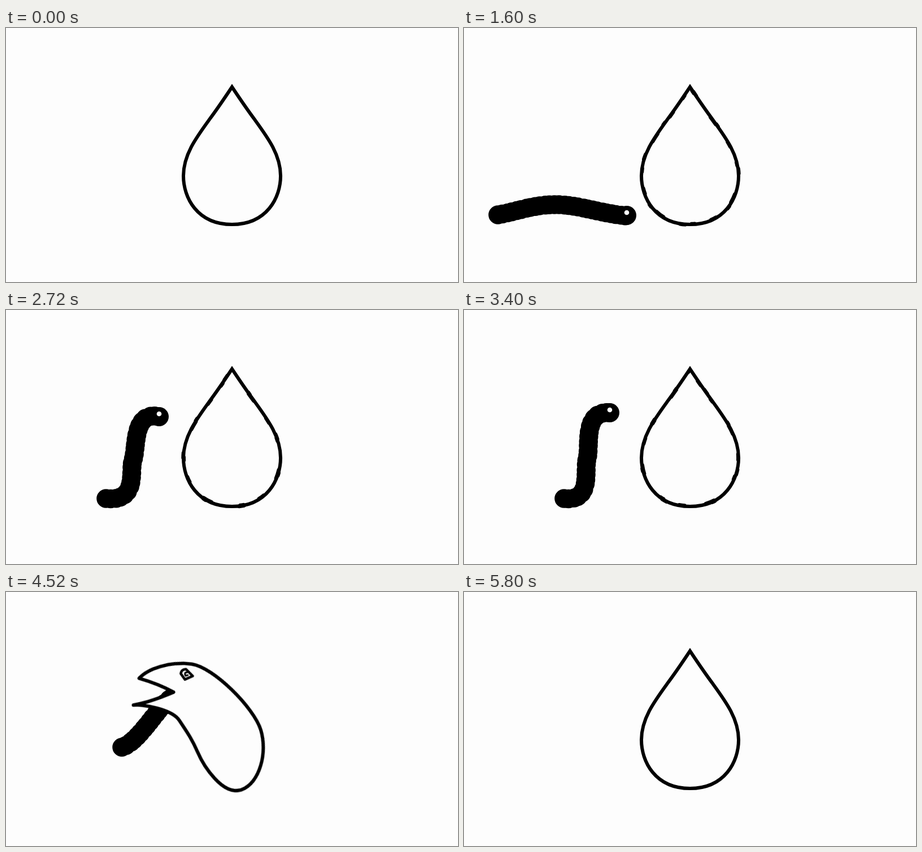
Animation of 800 by 450 pixels, one loop 5920 ms. Source, as an HTML page without scripts:

```html
<!DOCTYPE html>
<html lang="en">
<head>
<meta charset="utf-8">
<title>Worm and drop</title>
<style>
html, body { margin: 0; width: 100%; height: 100%; overflow: hidden; background: #fdfdfd; }
svg { display: block; width: 800px; height: 450px; }
.line { fill: none; stroke: #000; stroke-width: 6; }
.round { stroke-linecap: round; stroke-linejoin: round; }

/* everything moves in steps of about 100 ms */
.drop, .creature, .boil, .bump, .worm, .body, .face, .beast, .skin, .teeth, .eye, .glare {
  animation: 5920ms steps(3) infinite;
}
.drop, .creature, .boil, .worm, .teeth, .eye, .glare { animation-timing-function: step-end; }
.drop { animation-name: drop; }
.creature { animation-name: creature; }
.boil { animation-name: boil; }
.bump { animation-name: bump; animation-timing-function: steps(59); stroke-dasharray: 10 38 16 52 6 30; }
.in { transform: translate(400px, 240px) scale(.988) translate(-400px, -240px); }
.out { transform: translate(400px, 240px) scale(1.008) translate(-400px, -240px); stroke-dasharray: 5 61 9 83; }
.worm { animation-name: worm; }
.body { animation-name: crawl; fill: none; stroke: #000; stroke-width: 33.5; stroke-linecap: round; stroke-dasharray: 0 8 0 10 0 7 0 9; }
.face { animation-name: face; }
.beast { animation-name: lunge; transform-origin: 425px 346px; }
.skin { animation-name: morph; fill: #fdfdfd; }
.teeth { animation-name: teeth; }
.eye { animation-name: eye; }
.glare { animation-name: glare; }

@keyframes drop {
  0%, 94.5% { opacity: 1; }
  64.1% { opacity: 0; }
}
@keyframes creature {
  0%, 94.5% { opacity: 0; }
  64.1% { opacity: 1; }
}
@keyframes boil {
  0%, 97.9% { opacity: 0; }
  3.37% { opacity: 1; }
}
@keyframes bump { to { stroke-dashoffset: 2183; } }
@keyframes worm {
  0%, 81% { opacity: 0; }
  3.37% { opacity: 1; }
}
@keyframes crawl {
  0%, 1.68% { d: path("M-240 331C-200 331 -170 331 -150 331S-90 333 -60 333"); }
  6.7% { d: path("M-130 331C-90 331 -50 318 -20 318S50 333 90 333"); }
  11.8% { d: path("M0 331C25 328 45 306 66 306S105 333 130 334"); }
  16.8% { d: path("M3 331C40 330 60 312 95 312S150 333 190 333"); }
  21.9% { d: path("M5 331C45 331 90 316 120 315S190 332 235 333"); }
  27% { d: path("M60 331C95 325 125 312 165 313S240 328 288 333"); }
  32% { d: path("M117 331C150 330 165 290 200 290S250 333 286 333"); animation-timing-function: steps(4); }
  38.8% { d: path("M165 333C190 333 195 255 222 255S255 333 285 330"); }
  43.9% { d: path("M177 334C225 340 218 285 224 262S240 225 282 225"); }
  45.6%, 52.3% { d: path("M177 334C235 340 218 285 225 265S224 178 271 189"); }
  57.4% { d: path("M177 334C228 340 212 285 218 263S210 178 258 182"); }
  62.5%, 72.6% { d: path("M177 334C235 340 218 285 225 265S224 178 271 189"); animation-timing-function: step-end; }
  74.3% { d: path("M167 312C215 325 205 285 222 260S245 194 290 190"); animation-timing-function: step-end; }
  76% { d: path("M205 275C225 270 250 235 270 210S310 175 330 170"); animation-timing-function: step-end; }
  77.7% { d: path("M270 215C285 205 295 195 310 183S340 165 360 160"); animation-timing-function: step-end; }
  79.3%, 100% { d: path("M350 142C355 142 360 143 365 145S375 149 380 150"); }
}
@keyframes face {
  0%, 1.68% { transform: translate(-60px, 333px); }
  6.7% { transform: translate(90px, 333px); }
  11.8% { transform: translate(130px, 334px); }
  16.8% { transform: translate(190px, 333px); }
  21.9% { transform: translate(235px, 333px); }
  27% { transform: translate(288px, 332px); }
  32% { transform: translate(286px, 333px); animation-timing-function: steps(4); }
  38.8% { transform: translate(285px, 330px); }
  43.9% { transform: translate(282px, 225px); }
  45.6%, 52.3% { transform: translate(271px, 189px); }
  57.4% { transform: translate(258px, 182px); }
  62.5%, 72.6% { transform: translate(271px, 189px); animation-timing-function: step-end; }
  74.3% { transform: translate(290px, 190px); animation-timing-function: step-end; }
  76% { transform: translate(330px, 170px); animation-timing-function: step-end; }
  77.7% { transform: translate(360px, 160px); animation-timing-function: step-end; }
  79.3%, 100% { transform: translate(380px, 150px); }
}
@keyframes lunge {
  0%, 69.2% { transform: rotate(0deg); animation-timing-function: step-end; }
  70.9% { transform: rotate(5deg); animation-timing-function: step-end; }
  72.6%, 74.3% { transform: rotate(-25deg); }
  79.3%, 100% { transform: rotate(0deg); }
}
@keyframes morph {
  0%, 62.4%, 94.5%, 100% {
    d: path("M400 104C415 127 428 146 440 162S486 225 486 262S462 348 400 348S314 300 314 262S336 195 360 162S385 127 400 104Q400 104 400 104Q400 104 400 104Z");
  }
  67.5%, 74.3% {
    d: path("M316 67C336 64 387 95 412 119S477 207 475 250S452 344 425 346S376 275 371 250S353 205 343 190S284 152 281 131Q310 146 372 149Q345 107 316 67Z");
  }
  79.3%, 84.4% {
    d: path("M265 186C280 158 306 88 362 89.5S482 230 487 268S448 350 397 351S339 312 340 285S352 255 351 215S303 152 265 186Q300 166 307 145Q300 166 265 186Z");
  }
  89.5% {
    d: path("M330 130C345 105 370 92 400 92S524 220 524 268S462 354 400 354S310 300 310 262S345 200 350 180S320 160 330 130Q330 130 330 130Q330 130 330 130Z");
  }
}
@keyframes teeth {
  0%, 76% { opacity: 0; }
  67.5% { opacity: 1; }
}
@keyframes eye {
  0%, 77.7% { opacity: 0; }
  67.5% { opacity: 1; }
}
@keyframes glare {
  0%, 86.1% { opacity: 0; }
  79.3% { opacity: 1; }
}
</style>
</head>
<body>
<svg viewBox="0 0 800 450">
  <defs>
    <path id="tear" d="M400 104.500C385 127 372 146 360 162C336 195 314 225 314 262C314 300 338 348 400 348C462 348 486 300 486 262C486 225 464 195 440 162C428 146 415 127 400 104.500Z"/>
  </defs>

  <g class="drop line">
    <use href="#tear"/>
    <g class="boil round">
      <use class="bump in" href="#tear"/>
      <use class="bump out" href="#tear"/>
    </g>
  </g>

  <g class="worm">
    <path class="body" d="M-240 331C-200 331 -170 331 -150 331S-90 333 -60 333"/>
    <g class="face">
      <circle r="17"/>
      <circle cy="-5" r="4.300" fill="#fdfdfd"/>
    </g>
  </g>

  <g class="creature">
    <g class="beast line round">
      <path class="skin" d="M400 104Z"/>
      <g class="teeth" fill="#000" stroke-width="3">
        <path d="M316 67L312 80L319 82L321 94L328 90L331 104L338 102L342 115L348 113L351 126L355 124L359 138L372 149Z"/>
        <path d="M281 131L287 123L291 132L298 129L303 137L312 134L317 139L325 135L330 141L341 137L345 143L351 139L356 144L372 149Q310 146 281 131Z"/>
      </g>
      <g class="eye" stroke-width="4.500">
        <path d="M372 120Q375 113 383 115L391 130L376 132Z"/>
        <path d="M383 121Q378 119 379 126L383 126" stroke-width="3"/>
      </g>
      <g class="glare" stroke-width="4.500">
        <path d="M328 129L348 120L349 128Q345 137 338 135L333 134Z"/>
        <path d="M337 128Q338 131 341 129L341 126" stroke-width="3"/>
      </g>
    </g>
  </g>
</svg>
</body>
</html>
```
